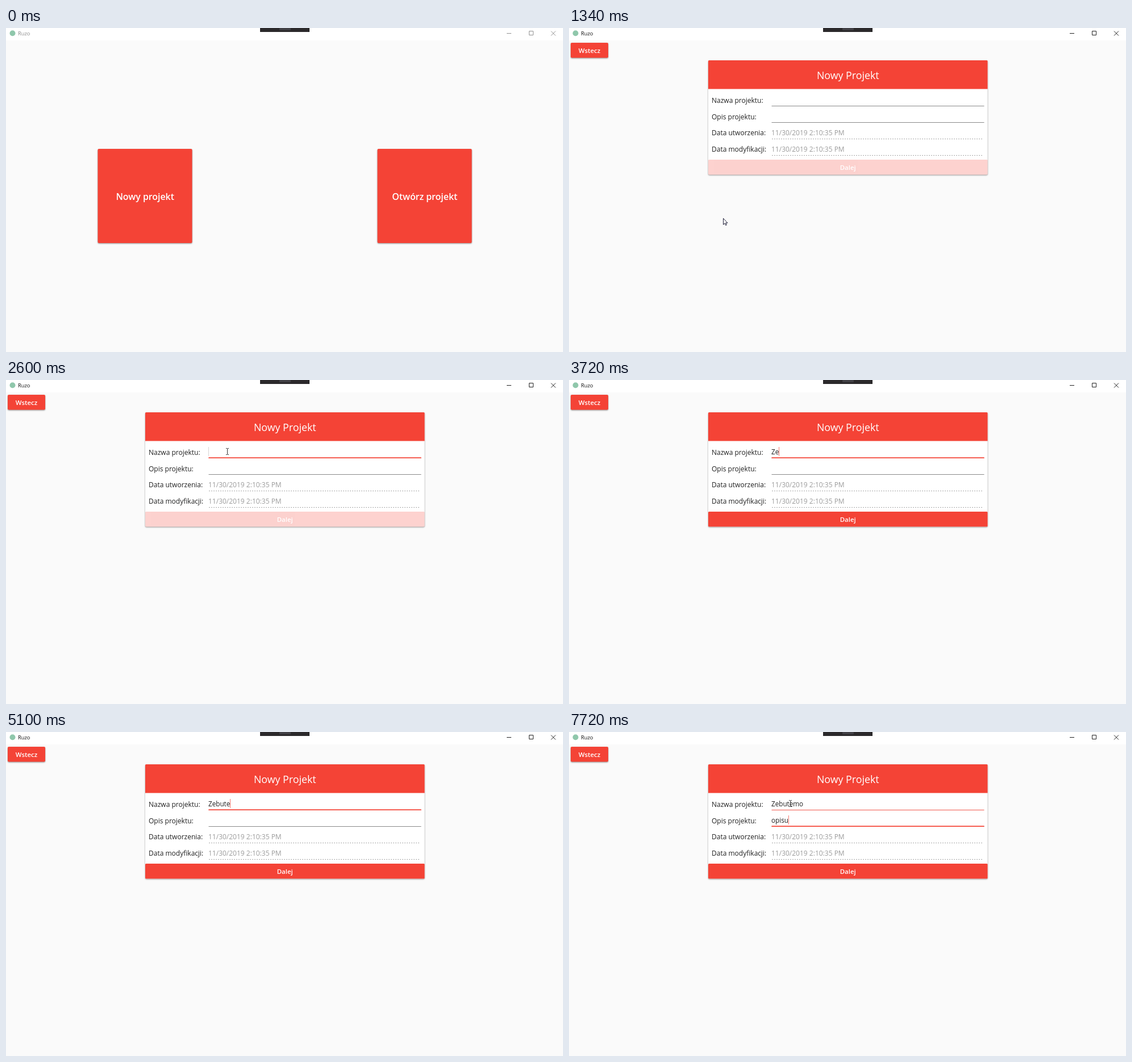
Animation of 980 by 571 pixels, one loop 8000 ms. Source, as an HTML page:

```html
<!DOCTYPE html>
<html lang="pl">
<head>
<meta charset="utf-8">
<title>Nowy projekt</title>
<style>
  html, body { margin: 0; width: 100%; height: 100%; overflow: hidden; background: #fafafa; }
  svg { display: block; width: 100%; height: 100%; }
  text { font-family: "Open Sans", "Noto Sans", sans-serif; fill: #212121; white-space: pre; }
  .red { fill: #f44336; }
  .raised { filter: drop-shadow(0 1px 1.3px rgba(0, 0, 0, .42)); }
  .pressed { filter: drop-shadow(0 1px 2px rgba(0, 0, 0, .72)); }
  .big { font-size: 15.9px; font-weight: 600; fill: #fff; text-anchor: middle; }
  .small { font-size: 11.4px; font-weight: 600; fill: #fff; text-anchor: middle; }
  .head { font-size: 17.8px; fill: #fff; text-anchor: middle; }
  .label { font-size: 12px; }
  .typed { font-size: 11.7px; }
  .date { font-size: 12px; fill: #9c9c9c; }
  .dots { stroke: #a6a6a6; stroke-dasharray: 2 2; }
  .cursor { fill: #fff; stroke: #23233c; stroke-linejoin: round; }
</style>
</head>
<body>
<svg viewBox="0 0 980 571">
  <rect width="980" height="571" fill="#fafafa"/>
  <rect width="980" height="22" fill="#fff"/>
  <rect x="447" width="87" height="7" fill="#2b292b"/>
  <rect x="481" width="20" height="4" rx="1" fill="#414045"/>
  <circle cx="11.5" cy="9.3" r="5" fill="#8fc7ab"/>
  <text id="title" x="21" y="13" font-size="9.3">Ruzo</text>
  <path id="controls" d="M881 9.5h8M920.5 5.5h7v7h-7zM959 5.5l8 8m0-8l-8 8" fill="none"/>

  <g id="start">
    <rect id="newTile" class="red raised" x="161.5" y="213" width="166" height="166" rx="2"/>
    <rect class="red raised" x="653.5" y="213" width="166" height="166" rx="2"/>
    <text class="big" x="244.7" y="303">Nowy projekt</text>
    <text class="big" x="736.7" y="303">Otwórz projekt</text>
  </g>

  <g id="form">
    <rect class="red raised" x="3" y="26" width="66" height="26.5" rx="2"/>
    <text class="small" x="36" y="44">Wstecz</text>
    <rect class="raised" x="245" y="57" width="491.5" height="201.5" rx="2" fill="#fff"/>
    <path class="red" d="M245 107.5V58.5q0-1.500 1.500-1.500h488.500q1.500 0 1.500 1.500v49z"/>
    <text class="head" x="490.700" y="89.500">Nowy Projekt</text>
    <text class="label" x="251" y="131.500">Nazwa projektu:</text>
    <text class="label" x="251" y="160.500">Opis projektu:</text>
    <text class="label" x="251" y="189.200">Data utworzenia:</text>
    <text class="label" x="251" y="218.200">Data modyfikacji:</text>
    <text class="date" x="356" y="189">11/30/2019 2:10:35 PM</text>
    <text class="date" x="356" y="217.700">11/30/2019 2:10:35 PM</text>
    <path class="dots" d="M357 195.500h372M357 224.500h372"/>
    <g id="fields"></g>
    <g id="next">
      <rect class="red" x="245" y="232" width="491.500" height="26.500" rx="1.500"/>
      <text class="small" x="490.700" y="250">Dalej</text>
    </g>
  </g>

  <g id="pointer">
    <path id="arrow" class="cursor" d="M.5.5v11l2.500-2.300 1.800 3.600 1.600-.8-1.700-3.400h3.300z"/>
    <path id="hand" class="cursor" d="M-1 .5q1.300-1 2.300.3v4.600l5 1q1.700.4 1.600 2l-.6 3.800-1.200 2.300h-5.500L-4.400 9.300q-.4-1.600 1.100-1.500L-1.200 9.500z"/>
    <path id="beam" d="M-2-5.500h1.500q.5 0 1 .5.500-.5 1-.5h1.500M.5-5V5M-2 5.500h1.500q.5 0 1-.5.500.5 1 .5h1.500" fill="none" stroke="#333"/>
  </g>
</svg>
<script>
const LOOP = 8000;
const $ = id => document.getElementById(id);
const show = (el, on) => el.setAttribute('visibility', on ? 'visible' : 'hidden');

// Value of the last [time, value] step that has been reached.
const at = (track, t) => track.reduce((now, [time, value]) => t >= time ? value : now, track[0][1]);

const pointerTrack = [
  [0, null],
  [600, ['arrow', 863, 543]], [720, ['arrow', 560, 490]], [840, ['arrow', 293, 419]],
  [980, ['arrow', 283, 385]], [1110, ['hand', 273, 338]], [1230, ['hand', 272, 336]],
  [1340, ['arrow', 271, 335]], [1470, ['arrow', 275, 338]],
  [1720, ['arrow', 290, 310]], [1840, ['arrow', 328, 238]], [1960, ['arrow', 362, 180]],
  [2080, ['beam', 380, 149]], [2220, ['beam', 386, 130]], [2330, ['beam', 389, 121]],
  [2470, ['beam', 389, 126]], [3600, null], [5600, ['beam', 389, 126]]
];

const fields = [
  {
    y: 137,
    text: [[0, ''], [3600, 'Z'], [3720, 'Ze'], [3850, 'Zeb'], [4330, 'Zebut'], [4600, 'Zebute'],
      [4870, 'Zebutea'], [5100, 'Zebute'], [5350, 'Zebutem'], [5470, 'Zebutemo']],
    caret: [[0, 0], [2470, 1], [2970, 0], [3470, 1], [5600, 0]],
    focus: [[0, 0], [2470, .5], [2600, 1], [5720, .4], [5840, 0]],
    hover: [[0, 0], [2220, 1]]
  },
  {
    y: 166,
    text: [[0, ''], [7340, 'op'], [7480, 'opi'], [7600, 'opis'], [7720, 'opisu']],
    caret: [[0, 0], [5600, 1], [6110, 0], [6590, 1], [7110, 0], [7340, 1]],
    focus: [[0, 0], [5600, .2], [5720, .7], [5840, 1]],
    hover: [[0, 0], [2080, 1], [2220, 0]]
  }
];

function add(parent, tag, attrs) {
  const el = document.createElementNS(parent.namespaceURI, tag);
  for (const name in attrs) el.setAttribute(name, attrs[name]);
  return parent.appendChild(el);
}

for (const field of fields) {
  const { y } = field;
  field.line = add($('fields'), 'rect', { x: 356.5, y, width: 374, height: 1 });
  field.bar = add($('fields'), 'rect', { y: y - .7, height: 1.7, class: 'red' });
  field.label = add($('fields'), 'text', { x: 356, y: y - 6, class: 'typed' });
  field.mark = add($('fields'), 'rect', { y: y - 19, width: 1, height: 16 });
}

function drawField(field, t) {
  const text = at(field.text, t);
  const width = 374 * at(field.focus, t);
  field.label.textContent = text;
  field.line.setAttribute('fill', at(field.hover, t) ? '#f0574c' : '#8a8a8a');
  field.bar.setAttribute('x', 543.5 - width / 2);
  field.bar.setAttribute('width', width);
  const end = text ? field.label.getComputedTextLength() : 0;
  field.mark.setAttribute('x', Math.round(356 + end));
  field.mark.setAttribute('fill', text ? '#f5796f' : '#d8d4d4');
  field.mark.setAttribute('opacity', at(field.caret, t));
}

function draw(t) {
  const active = t >= 1230;
  const formOpen = t >= 1340;
  $('title').style.fill = active ? '#111' : '#8c8c8c';
  $('controls').setAttribute('stroke', active ? '#222' : '#929292');
  $('newTile').setAttribute('class', active ? 'red pressed' : 'red raised');
  $('start').style.display = formOpen ? 'none' : '';
  $('form').style.display = formOpen ? '' : 'none';
  // The disabled button is a pale tint over the white card.
  $('next').setAttribute('opacity', t >= 3600 ? 1 : .24);
  if (formOpen) fields.forEach(field => drawField(field, t));

  const pointer = at(pointerTrack, t);
  for (const kind of ['arrow', 'hand', 'beam']) show($(kind), pointer && pointer[0] === kind);
  if (pointer) $('pointer').setAttribute('transform', `translate(${pointer[1]} ${pointer[2]})`);
}

const begin = performance.now();
function tick() {
  draw((performance.now() - begin) % LOOP);
  requestAnimationFrame(tick);
}
tick();
</script>
</body>
</html>
```
